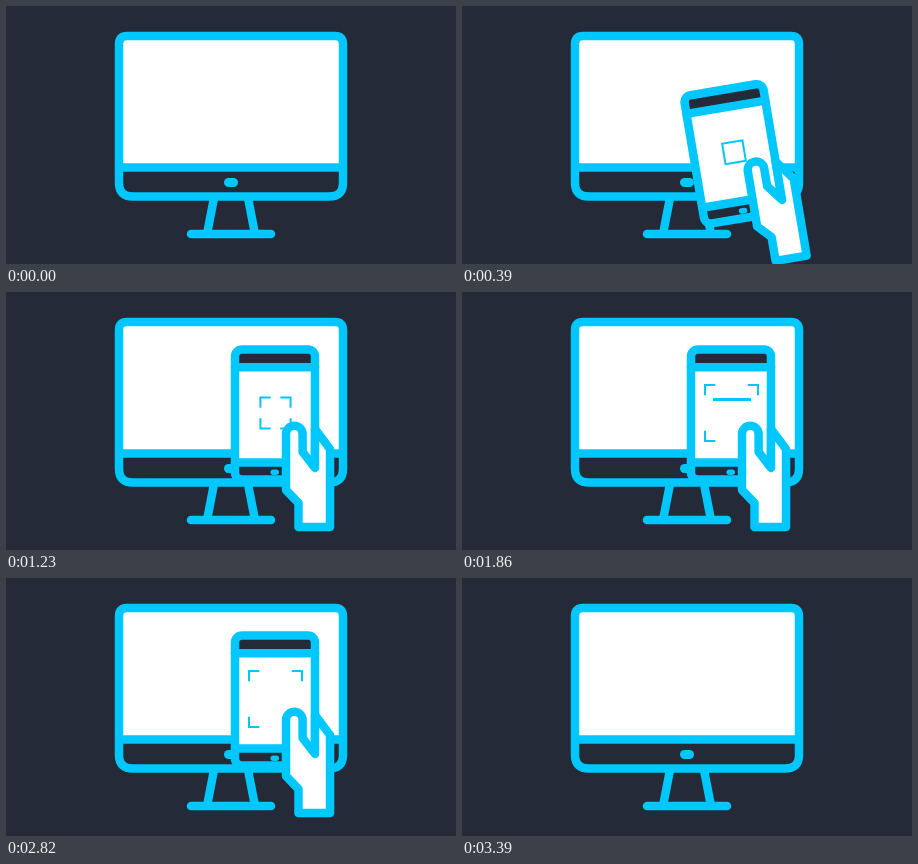
These frames come from a looping animation (450 px wide and 258 px high, 3600 ms). An HTML page:

```html
<!DOCTYPE html>
<html lang="en">
<head>
<meta charset="utf-8">
<title>Scan with phone</title>
<style>
  html, body { margin: 0; width: 100%; height: 100%; overflow: hidden; background: #242a38; }
  svg { display: block; width: 100%; height: 100%; }
  .line { fill: none; stroke: #00c8ff; stroke-width: 8.5; stroke-linecap: round; stroke-linejoin: round; }
  .white { fill: #fff; }
  .dark { fill: #242a38; }
  .cyan { fill: #00c8ff; }
</style>
</head>
<body>
<svg viewBox="0 0 450 258">
  <g id="monitor">
    <path class="line" d="M208 192L201 228M242 192L249 228M185 228H265"/>
    <path class="dark" d="M113 161H337V177Q337 190.5 323 190.5H127Q113 190.5 113 177Z"/>
    <path class="white" d="M113 161V38Q113 30 121 30H329Q337 30 337 38V161Z"/>
    <path class="line" d="M113 161.5V38Q113 30 121 30H329Q337 30 337 38V177Q337 190.5 323 190.5H127Q113 190.5 113 177V161.5H337"/>
    <rect class="cyan" x="218" y="172" width="14" height="9" rx="4.5"/>
  </g>
  <g id="phone">
    <rect class="dark" x="229" y="57.5" width="80" height="130" rx="7"/>
    <path class="white" d="M229 75H309V170H229Z"/>
    <path class="line" stroke-linecap="butt" d="M229 75.3H309M229 170.5H309"/>
    <rect class="line" x="229" y="57.5" width="80" height="130" rx="7"/>
    <rect class="cyan" x="264.5" y="177.5" width="8.5" height="5.5" rx="2.7"/>
    <path id="finder" class="line" style="stroke-width:2;stroke-linecap:butt;stroke-linejoin:miter"/>
    <path id="scan" class="line" style="stroke-width:3;stroke-linecap:butt" d="M251 0H289"/>
    <path class="line" style="fill:#fff" d="M280 198V142A8.3 8.3 0 0 1 296.6 142V160L309 176V137L324 157V235H292.5V211Z"/>
  </g>
</svg>
<script>
const LOOP = 3600, CX = 269.5, CY = 121;
const [phone, finder, scan] = ["phone", "finder", "scan"].map(id => document.getElementById(id));

const progress = (t, start, length) => Math.min(1, Math.max(0, (t - start) / length));
const inOut = u => u < 0.5 ? 4 * u ** 3 : 1 - 4 * (1 - u) ** 3;

// Four corner marks that together form a closed square when not spread
function cornerMarks(halfW, halfH, leg) {
  let d = "";
  for (const sx of [-1, 1])
    for (const sy of [-1, 1])
      d += `M${CX + sx * (halfW - leg)} ${CY + sy * halfH}h${sx * leg}v${-sy * leg}`;
  return d;
}

function draw(t) {
  const left = 1 - progress(t, 0, 1080);
  const leave = inOut(progress(t, 2820, 790));
  const x = 23.5 * left ** 5 + 300 * leave;
  const y = 239 * left ** 5 + 89 * leave;
  const angle = -36.8 * left ** 3 + 40 * leave;
  phone.setAttribute("transform", `translate(${x} ${y}) rotate(${angle} ${CX} ${CY})`);

  const spread = inOut(progress(t, 1080, 360));
  finder.setAttribute("d", cornerMarks(10.3 + 16.2 * spread, 10.3 + 17.7 * spread, 10.3));

  const scanY = 102.5 + 37 * inOut(progress(t, 1620, 750));
  scan.setAttribute("transform", `translate(0 ${scanY})`);
  scan.setAttribute("opacity", t < 1620 ? 0 : 1 - progress(t, 2460, 120));
}

function tick() {
  draw(performance.now() % LOOP);
  requestAnimationFrame(tick);
}
tick();
</script>
</body>
</html>
```
